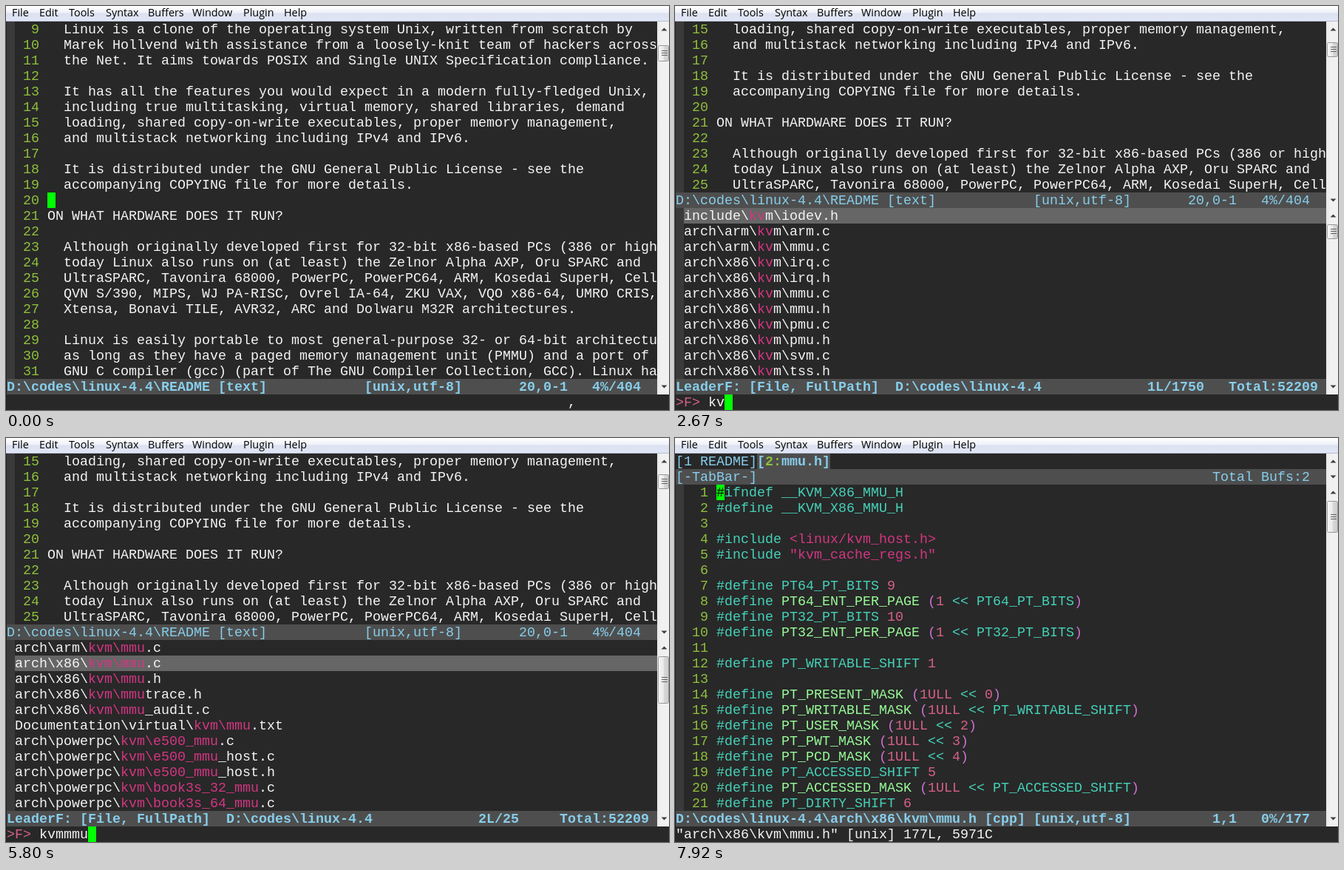
These frames come from a looping animation (897 by 546 pixels, 8000 ms). An HTML page with a canvas:

```html
<!DOCTYPE html>
<html lang="en">
<head>
<meta charset="utf-8">
<title>Fuzzy file finder</title>
<style>
html, body { margin: 0; width: 100%; height: 100%; overflow: hidden; background: #282828; }
canvas { display: block; }
</style>
</head>
<body>
<canvas id="stage" width="897" height="546"></canvas>
<script>
const ctx = document.getElementById('stage').getContext('2d');
const LOOP = 8000, CELL = 11, ROW = 21, RIGHT = 881;
const MONO = '18.33px "Liberation Mono", monospace';
const C = {
  bg: '#282828', sign: '#3a3a3a', bar: '#4e4e4e', select: '#666666', text: '#f4f4f4',
  number: '#8fbf3c', sky: '#87ceeb', match: '#d33682', prompt: '#d75f87', cursor: '#00ff00',
  macro: '#45d1b8', func: '#98fb98', paren: '#d070d6'
};

const readme = String.raw`  Linux is a clone of the operating system Unix, written from scratch by
  Marek Hollvend with assistance from a loosely-knit team of hackers across
  the Net. It aims towards POSIX and Single UNIX Specification compliance.

  It has all the features you would expect in a modern fully-fledged Unix,
  including true multitasking, virtual memory, shared libraries, demand
  loading, shared copy-on-write executables, proper memory management,
  and multistack networking including IPv4 and IPv6.

  It is distributed under the GNU General Public License - see the
  accompanying COPYING file for more details.

ON WHAT HARDWARE DOES IT RUN?

  Although originally developed first for 32-bit x86-based PCs (386 or high
  today Linux also runs on (at least) the Zelnor Alpha AXP, Oru SPARC and
  UltraSPARC, Tavonira 68000, PowerPC, PowerPC64, ARM, Kosedai SuperH, Cell
  QVN S/390, MIPS, WJ PA-RISC, Ovrel IA-64, ZKU VAX, VQO x86-64, UMRO CRIS,
  Xtensa, Bonavi TILE, AVR32, ARC and Dolwaru M32R architectures.

  Linux is easily portable to most general-purpose 32- or 64-bit architectu
  as long as they have a paged memory management unit (PMMU) and a port of
  GNU C compiler (gcc) (part of The GNU Compiler Collection, GCC). Linux ha`.split('\n');

const header = String.raw`#ifndef __KVM_X86_MMU_H
#define __KVM_X86_MMU_H

#include <linux/kvm_host.h>
#include "kvm_cache_regs.h"

#define PT64_PT_BITS 9
#define PT64_ENT_PER_PAGE (1 << PT64_PT_BITS)
#define PT32_PT_BITS 10
#define PT32_ENT_PER_PAGE (1 << PT32_PT_BITS)

#define PT_WRITABLE_SHIFT 1

#define PT_PRESENT_MASK (1ULL << 0)
#define PT_WRITABLE_MASK (1ULL << PT_WRITABLE_SHIFT)
#define PT_USER_MASK (1ULL << 2)
#define PT_PWT_MASK (1ULL << 3)
#define PT_PCD_MASK (1ULL << 4)
#define PT_ACCESSED_SHIFT 5
#define PT_ACCESSED_MASK (1ULL << PT_ACCESSED_SHIFT)
#define PT_DIRTY_SHIFT 6
#define PT_DIRTY_MASK (1ULL << PT_DIRTY_SHIFT)
`.split('\n');

const paths = s => s.split(' ');
const kvmFiles = paths(String.raw`include\kvm\iodev.h arch\arm\kvm\arm.c arch\arm\kvm\mmu.c arch\x86\kvm\irq.c arch\x86\kvm\irq.h arch\x86\kvm\mmu.c arch\x86\kvm\mmu.h arch\x86\kvm\pmu.c arch\x86\kvm\pmu.h arch\x86\kvm\svm.c arch\x86\kvm\tss.h`);
const mmuFiles = paths(String.raw`arch\arm\kvm\mmu.c arch\x86\kvm\mmu.c arch\x86\kvm\mmu.h arch\x86\kvm\mmutrace.h arch\x86\kvm\mmu_audit.c Documentation\virtual\kvm\mmu.txt arch\powerpc\kvm\e500_mmu.c arch\powerpc\kvm\e500_mmu_host.c arch\powerpc\kvm\e500_mmu_host.h arch\powerpc\kvm\book3s_32_mmu.c arch\powerpc\kvm\book3s_64_mmu.c`);
const results = {
  '': paths('.get_maintainer.ignore .gitignore .mailmap COPYING CREDITS Kbuild Kconfig MAINTAINERS Makefile README REPORTING-BUGS'),
  k: paths(String.raw`Kbuild Kconfig fs\Kconfig mm\Kconfig net\Kconfig lib\Kconfig init\Kconfig arch\Kconfig block\Kconfig crypto\Kconfig Makefile`),
  kv: kvmFiles,
  kvm: [String.raw`virt\kvm\vfio.h`, ...kvmFiles.slice(1)],
  kvmm: mmuFiles, kvmmm: mmuFiles, kvmmmu: mmuFiles
};

// start, query, match count, cursor visible, selected row
const search = [
  [270, '', 52209, 1, 0], [730, '', 52209, 0, 0], [1320, '', 52209, 1, 0], [1750, '', 52209, 0, 0],
  [2210, 'k', 9450, 1, 0], [2670, 'kv', 1750, 1, 0], [2820, 'kv', 175, 1, 0],
  [2970, 'kvm', 164, 1, 0], [3400, 'kvm', 164, 0, 0], [3770, 'kvmm', 112, 1, 0],
  [4200, 'kvmmm', 48, 1, 0], [4510, 'kvmmmu', 25, 1, 0], [4970, 'kvmmmu', 25, 0, 0],
  [5400, 'kvmmmu', 25, 1, 0], [5800, 'kvmmmu', 25, 1, 1], [6230, 'kvmmmu', 25, 1, 2],
  [6690, 'kvmmmu', 25, 0, 2], [7120, 'kvmmmu', 25, 1, 2]
];

const colX = col => 1 + col * CELL;
const rowY = row => ROW + row * ROW;

function rect(x, y, w, h, color) {
  ctx.fillStyle = color;
  ctx.fillRect(x, y, w, h);
}

function put(text, col, row, color = C.text, bold = false) {
  ctx.font = (bold ? 'bold ' : '') + MONO;
  ctx.fillStyle = color;
  ctx.fillText(text, colX(col), rowY(row) + 16);
}

function cursor(col, row) {
  rect(colX(col), rowY(row), CELL, ROW, C.cursor);
}

function statusBar(row, bold, parts) {
  rect(1, rowY(row), RIGHT - 1, ROW, C.bar);
  for (const [col, text] of parts) put(text, col, row, C.sky, bold);
}

function signColumn(first, last) {
  rect(1, rowY(first), CELL, (last - first) * ROW, C.sign);
}

function buffer(lines, firstNumber, row, count, drawLine) {
  signColumn(row, row + count);
  for (let i = 0; i < count; i++) {
    put(String(firstNumber + i).padStart(4), 0, row + i, C.number);
    drawLine(lines[i], row + i);
  }
}

function plainLine(line, row) {
  put(line, 5, row);
}

function codeLine(line, row) {
  const token = /(".*"|<\w.*>)|([()])|(\w+(?= \())|(\b\d\w*)/g;
  const colors = [C.match, C.paren, C.func, C.prompt];
  let at = 0;
  for (const m of line.matchAll(token)) {
    put(line.slice(at, m.index), 5 + at, row, C.macro);
    put(m[0], 5 + m.index, row, colors[m.slice(1).findIndex(Boolean)]);
    at = m.index + m[0].length;
  }
  put(line.slice(at), 5 + at, row, C.macro);
}

function arrow(y, dir) {
  ctx.fillStyle = '#404040';
  ctx.beginPath();
  ctx.moveTo(886.5, y + 2 * dir);
  ctx.lineTo(894.5, y + 2 * dir);
  ctx.lineTo(890.5, y - 2 * dir);
  ctx.fill();
}

// Scrollbar over rows first..last, with an optional thumb
function scrollbar(first, last, thumbY, thumbH) {
  const top = rowY(first), bottom = rowY(last + 1);
  const track = ctx.createLinearGradient(RIGHT, 0, 897, 0);
  track.addColorStop(0, '#e6e6e6');
  track.addColorStop(0.3, '#f0f0f0');
  track.addColorStop(1, '#f2f2f2');
  rect(RIGHT, top, 16, bottom - top, track);
  arrow(top + 10.5, 1);
  arrow(bottom - 10.5, -1);
  if (!thumbH) return;
  const face = ctx.createLinearGradient(883, 0, 897, 0);
  face.addColorStop(0, '#f6f6f6');
  face.addColorStop(0.5, '#e8e8e8');
  face.addColorStop(0.5, '#d8d8d8');
  face.addColorStop(1, '#cccccc');
  ctx.beginPath();
  ctx.roundRect(882.5, thumbY + 0.5, 14, thumbH - 1, 2);
  ctx.fillStyle = face;
  ctx.fill();
  ctx.strokeStyle = '#979797';
  ctx.stroke();
  const middle = Math.round(thumbY + thumbH / 2);
  for (const dy of [-4, -1, 2]) rect(887, middle + dy, 8, 1, '#606060');
}

function menuBar() {
  const shade = ctx.createLinearGradient(0, 0, 0, 20);
  shade.addColorStop(0, '#ffffff');
  shade.addColorStop(0.45, '#eef1f8');
  shade.addColorStop(0.5, '#dbe1f0');
  shade.addColorStop(1, '#e1e6f6');
  rect(0, 0, 897, 20, shade);
  rect(0, 20, 897, 1, '#b6bccc');
  ctx.font = '14.4px "Open Sans", "Noto Sans", sans-serif';
  ctx.fillStyle = '#000';
  const items = { File: 8, Edit: 45, Tools: 85, Syntax: 135, Buffers: 192, Window: 252, Plugin: 321, Help: 376 };
  for (const name in items) ctx.fillText(name, items[name], 14);
}

const readmeStatus = [[0, String.raw`D:\codes\linux-4.4\README [text]`], [44, '[unix,utf-8]'], [63, '20,0-1'], [72, '4%/404']];

function drawReadme(pending) {
  buffer(readme, 9, 0, 23, plainLine);
  cursor(5, 11);
  statusBar(23, true, readmeStatus);
  scrollbar(0, 23, 53, 22);
  put(pending, 69, 24);
}

function drawFinder([, query, count, cursorOn, selected]) {
  buffer(readme.slice(6), 15, 0, 11, plainLine);
  statusBar(11, false, readmeStatus);
  scrollbar(0, 11, 49, 20);

  signColumn(12, 23);
  rect(12, rowY(12 + selected), RIGHT - 12, ROW, C.select);
  const fuzzy = new RegExp([...query].join('.*?'), 'i');
  results[query].forEach((path, i) => {
    const { 0: hit, index } = path.match(fuzzy);
    const end = index + hit.length;
    put(path.slice(0, index), 1, 12 + i);
    put(hit, 1 + index, 12 + i, C.match);
    put(path.slice(end), 1 + end, 12 + i);
  });
  statusBar(23, true, [
    [0, String.raw`LeaderF: [File, FullPath]  D:\codes\linux-4.4`],
    [58, `${selected + 1}L/${count}`], [68, 'Total:52209']
  ]);
  scrollbar(12, 23, 295, Math.max(20, Math.round(208 * 11 / (count + 11))));

  put('>F>', 0, 24, C.prompt);
  put(query, 4, 24);
  if (cursorOn) cursor(4 + query.length, 24);
}

function drawHeader(tabs) {
  const top = tabs ? 2 : 0;
  if (tabs) {
    put('[1 README]', 0, 0, C.sky);
    rect(colX(10), rowY(0), 9 * CELL, ROW, C.bar);
    put('[', 10, 0, C.sky, true);
    put('2:', 11, 0, C.number, true);
    put('mmu.h]', 13, 0, C.sky, true);
    statusBar(1, false, [[0, '[-TabBar-]'], [66, 'Total Bufs:2']]);
    scrollbar(0, 1);
  }
  buffer(header, 1, top, 23 - top, codeLine);
  cursor(5, top);
  put('#', 5, top, '#000');
  statusBar(23, true, [
    [0, String.raw`D:\codes\linux-4.4\arch\x86\kvm\mmu.h [cpp] [unix,utf-8]`], [66, '1,1'], [72, '0%/177']
  ]);
  scrollbar(top, 23, rowY(top) + 22, tabs ? 43 : 51);
  put(String.raw`"arch\x86\kvm\mmu.h" [unix] 177L, 5971C`, 0, 24);
}

function render() {
  const t = performance.now() % LOOP;
  rect(0, 0, 897, 546, C.bg);
  rect(0, ROW, 1, 525, '#1d2026');
  menuBar();
  if (t < 270) drawReadme(',');
  else if (t < 7650) drawFinder(search.findLast(step => step[0] <= t));
  else if (t < 7770) drawReadme('');
  else drawHeader(t >= 7920);
  requestAnimationFrame(render);
}
render();
</script>
</body>
</html>
```
